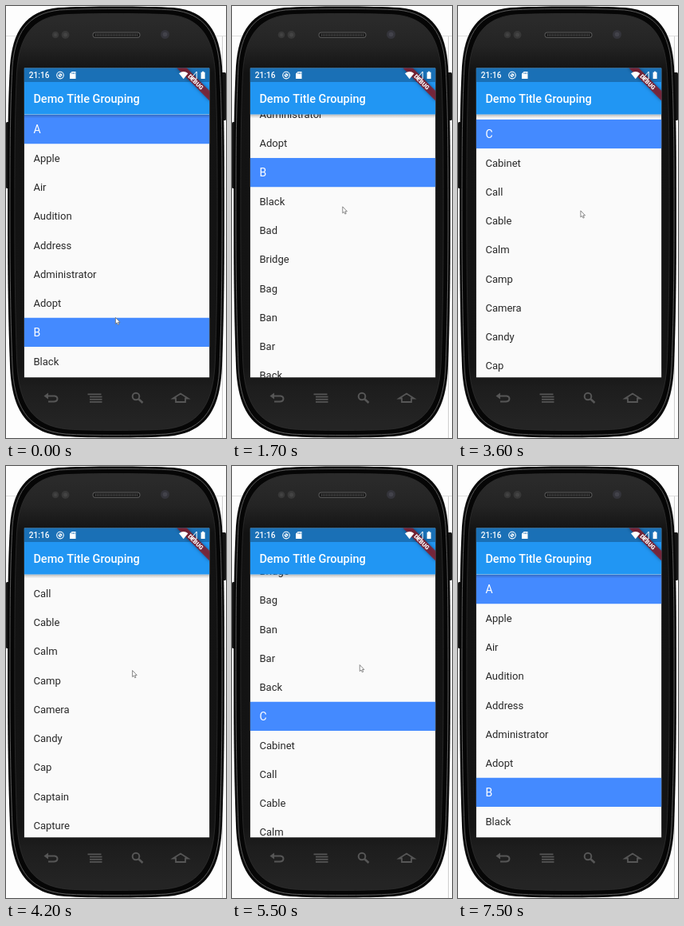
An HTML page with a canvas that plays this animation: 276x540 px, repeating every 7600 ms.

```html
<!DOCTYPE html>
<html lang="en">
<head>
<meta charset="utf-8">
<title>Grouped list</title>
<style>
html, body { margin: 0; width: 100%; height: 100%; overflow: hidden; background: #fff; }
canvas { display: block; width: 276px; height: 540px; }
</style>
</head>
<body>
<canvas id="stage"></canvas>
<script>
const W = 276, H = 540, LOOP = 7600, STEP = 100;
const SCREEN = { x: 22.7, y: 77.5, w: 232.7, h: 387 };
const LIST_TOP = 136, BAR_END = 135.5, ROW = 36.25, TEXT_X = 34.4;
const FONT = 'Roboto, sans-serif';
const ROWS = ('A Apple Air Audition Address Administrator Adopt ' +
  'B Black Bad Bridge Bag Ban Bar Back ' +
  'C Cabinet Call Cable Calm Camp Camera Candy Cap Captain Capture').split(' ');

// [time, scroll offset]
const SCROLL = [[300, 0], [700, 40], [1100, 107.9], [1800, 215], [2600, 338],
  [3600, 537.9], [4300, 613.5], [5000, 613.5], [5500, 385], [6100, 28.4], [6400, 0]];
// [time, tip x, tip y]
const POINTER = [[300, 137, 389], [1100, 134, 261], [2600, 149, 244], [3600, 153.5, 255.5],
  [4900, 162, 254], [6100, 156, 243], [6400, 154, 476], [6700, 150, 128], [7100, 132, -12]];

const canvas = document.getElementById('stage');
const ctx = canvas.getContext('2d');
const dpr = window.devicePixelRatio || 1;
canvas.width = W * dpr;
canvas.height = H * dpr;

// Monotone cubic through the keys, held at both ends
function track(keys, t, col = 1) {
  const n = keys.length - 1;
  if (t <= keys[0][0]) return keys[0][col];
  if (t >= keys[n][0]) return keys[n][col];
  const slope = k => (keys[k + 1][col] - keys[k][col]) / (keys[k + 1][0] - keys[k][0]);
  const tangent = k => {
    if (k === 0 || k === n) return 0;
    const a = slope(k - 1), b = slope(k);
    return a * b > 0 ? 2 * a * b / (a + b) : 0;
  };
  const i = keys.findIndex(k => k[0] > t) - 1;
  const d = keys[i + 1][0] - keys[i][0], u = (t - keys[i][0]) / d, v = 1 - u;
  return keys[i][col] * (1 + 2 * u) * v * v + tangent(i) * d * u * v * v +
    keys[i + 1][col] * u * u * (3 - 2 * u) - tangent(i + 1) * d * u * u * v;
}

function rect(x, y, w, h, color) {
  ctx.fillStyle = color;
  ctx.fillRect(x, y, w, h);
}

function pill(x, y, w, h, r, color) {
  ctx.beginPath();
  ctx.roundRect(x, y, w, h, r);
  ctx.fillStyle = color;
  ctx.fill();
}

function disc(x, y, r, color) {
  ctx.beginPath();
  ctx.arc(x, y, r, 0, 7);
  ctx.fillStyle = color;
  ctx.fill();
}

function shape(d, fill, stroke, width = 1) {
  const path = new Path2D(d);
  if (fill) { ctx.fillStyle = fill; ctx.fill(path); }
  if (stroke) { ctx.strokeStyle = stroke; ctx.lineWidth = width; ctx.stroke(path); }
}

function fade(y0, y1, stops) {
  const g = ctx.createLinearGradient(0, y0, 0, y1);
  stops.forEach(([at, color]) => g.addColorStop(at, color));
  return g;
}

function text(str, x, y, size, color, weight = 400, align = 'left') {
  ctx.font = `${weight} ${size}px ${FONT}`;
  ctx.textAlign = align;
  ctx.textBaseline = 'alphabetic';
  ctx.fillStyle = color;
  ctx.fillText(str, x, y);
}

const BODY = 'M66 2 C100 0 176 0 210 2 C252 6 268 32 271 75 C274 130 274 190 274 270 ' +
  'C274 340 273 400 271 450 C269 500 254 534 202 538 C170 540 106 540 74 538 ' +
  'C22 534 7 500 5 450 C3 400 2 340 2 270 C2 190 2 130 5 75 C8 32 24 6 66 2 Z';

function rim(inset, fill, stroke, width) {
  ctx.save();
  ctx.translate(W / 2, H / 2);
  ctx.scale(1 - inset * 2 / W, 1 - inset * 2 / H);
  ctx.translate(-W / 2, -H / 2);
  shape(BODY, fill, stroke, width);
  ctx.restore();
}

function drawPhone() {
  rect(0, 0, W, H, '#fdfdfd');
  rect(0, 37, W, 1, '#dedede');
  rect(271, 38, 1, H, '#cfcfcf');
  pill(0, 145, 6, 83, 1.5, '#151515');
  pill(270, 83, 6, 60, 1.5, '#151515');
  rim(0, '#080808');
  rim(3, null, '#5a5a5a', 1);
  rim(4.5, '#060606');
  const face = fade(10, 530, [[0, '#2a2a2a'], [0.06, '#242424'], [0.13, '#121212'],
    [0.86, '#141414'], [0.91, '#1d1d1d'], [1, '#242424']]);
  rim(9, face, '#303030', 0.8);

  disc(62, 36, 4.3, '#383838');
  disc(74.5, 36, 5, '#383838');
  disc(62, 36, 2, '#444');
  disc(74.5, 36, 2.5, '#444');
  disc(199.5, 35.5, 5.5, '#34343a');
  disc(199.5, 35.5, 2.8, '#43434b');
  pill(108.5, 32.5, 60, 7.5, 3.7, '#585858');
  pill(109.5, 33.5, 58, 5.5, 2.7, '#1a1a1a');
  for (let x = 112; x < 166; x += 2) rect(x, 34.5, 1, 3.5, '#444');
  drawKeys('#565656');
}

function drawKeys(c) {
  shape('M51 487.5 H61 Q64.5 488 64.5 491 Q64 494.5 60 494.5 H53', null, c, 2);
  shape('M47.5 487.5 L53 483.5 V491.5 Z', c);
  rect(102.5, 484.5, 17, 1.7, c);
  for (let i = 1; i < 4; i++) rect(105, 484.5 + i * 3.2, 15.5, 1.7, c);
  ctx.beginPath();
  ctx.arc(163, 488, 4.3, 0, 7);
  ctx.strokeStyle = c;
  ctx.lineWidth = 2;
  ctx.stroke();
  shape('M166.3 491.3 L171.5 496', null, c, 2.6);
  shape('M209.5 490.5 L219 484.5 L228.5 490.5 H225 V495 H213 V490.5 Z', null, c, 1.8);
}

function drawList(scroll) {
  ROWS.forEach((label, i) => {
    const y = LIST_TOP + i * ROW - scroll;
    if (y + ROW < BAR_END || y > SCREEN.y + SCREEN.h) return;
    const baseline = y + ROW / 2 + 4.5;
    if (label.length === 1) {
      rect(SCREEN.x, y, SCREEN.w, ROW, '#448aff');
      text(label, TEXT_X, baseline + 0.5, 14, '#fff');
    } else {
      text(label, TEXT_X, baseline, 13.05, 'rgba(0,0,0,.84)');
    }
  });
}

function drawAppBar() {
  const shade = fade(BAR_END, BAR_END + 5,
    [[0, 'rgba(0,0,0,.28)'], [0.4, 'rgba(0,0,0,.14)'], [1, 'rgba(0,0,0,0)']]);
  rect(SCREEN.x, BAR_END, SCREEN.w, 5, shade);
  rect(SCREEN.x, SCREEN.y, SCREEN.w, BAR_END - SCREEN.y, '#2196f3');
  rect(SCREEN.x, SCREEN.y, SCREEN.w, 17.5, '#1a70b6');
  text('Demo Title Grouping', TEXT_X, 120.7, 14.5, '#fff', 500);
}

function drawBanner() {
  ctx.save();
  ctx.translate(SCREEN.x + SCREEN.w, SCREEN.y);
  ctx.rotate(Math.PI / 4);
  ctx.shadowColor = 'rgba(0,0,0,.5)';
  ctx.shadowBlur = 4 * dpr;
  rect(-29, 20.3, 58, 8.7, 'rgba(140,24,36,.8)');
  ctx.shadowColor = 'transparent';
  text('DEBUG', 0, 27.3, 7.4, '#fff', 900, 'center');
  ctx.restore();
}

function drawStatus() {
  text('21:16', 28.8, 90.2, 10.15, '#fff', 500);
  ctx.beginPath();
  ctx.arc(68, 86.6, 4.3, 0, 7);
  ctx.strokeStyle = '#fff';
  ctx.lineWidth = 1.1;
  ctx.stroke();
  disc(68, 86.6, 2.4, '#fff');
  shape('M66 84.7 L70.2 88.6', null, '#1a70b6', 0.9);
  shape('M82.6 82 H87.5 V91 H80 V84.7 Z', '#fff');
  for (let i = 0; i < 3; i++) rect(82.5 + i * 1.6, 83.2, 0.8, 1.7, '#1a70b6');
  shape('M217 84.2 Q222.7 79.6 228.4 84.2 L222.7 91.2 Z', '#fff');
  shape('M239.2 82 V91 H231.5 Z', null, '#fff', 1);
  shape('M244.6 82.8 H246 V81.8 H248.2 V82.8 H249.6 V91 H244.6 Z', '#fff');
}

function drawPointer(x, y) {
  ctx.save();
  ctx.translate(x, y);
  shape('M.4 .4 V8.4 L2.2 6.8 L3.5 9.6 L4.8 9 L3.6 6.3 H6 Z', '#fff', '#6c6c6c', 0.8);
  ctx.restore();
}

function draw(now) {
  const t = Math.floor(now % LOOP / STEP) * STEP;
  ctx.setTransform(dpr, 0, 0, dpr, 0, 0);
  drawPhone();

  ctx.save();
  ctx.beginPath();
  ctx.rect(SCREEN.x, SCREEN.y, SCREEN.w, SCREEN.h);
  ctx.clip();
  rect(SCREEN.x, SCREEN.y, SCREEN.w, SCREEN.h, '#fafafa');
  drawList(track(SCROLL, t));
  drawAppBar();
  drawBanner();
  drawStatus();
  ctx.restore();

  if (t < 7100) drawPointer(track(POINTER, t, 1), track(POINTER, t, 2));
}

const start = performance.now();
function loop() {
  draw(performance.now() - start);
  requestAnimationFrame(loop);
}
loop();
</script>
</body>
</html>
```
